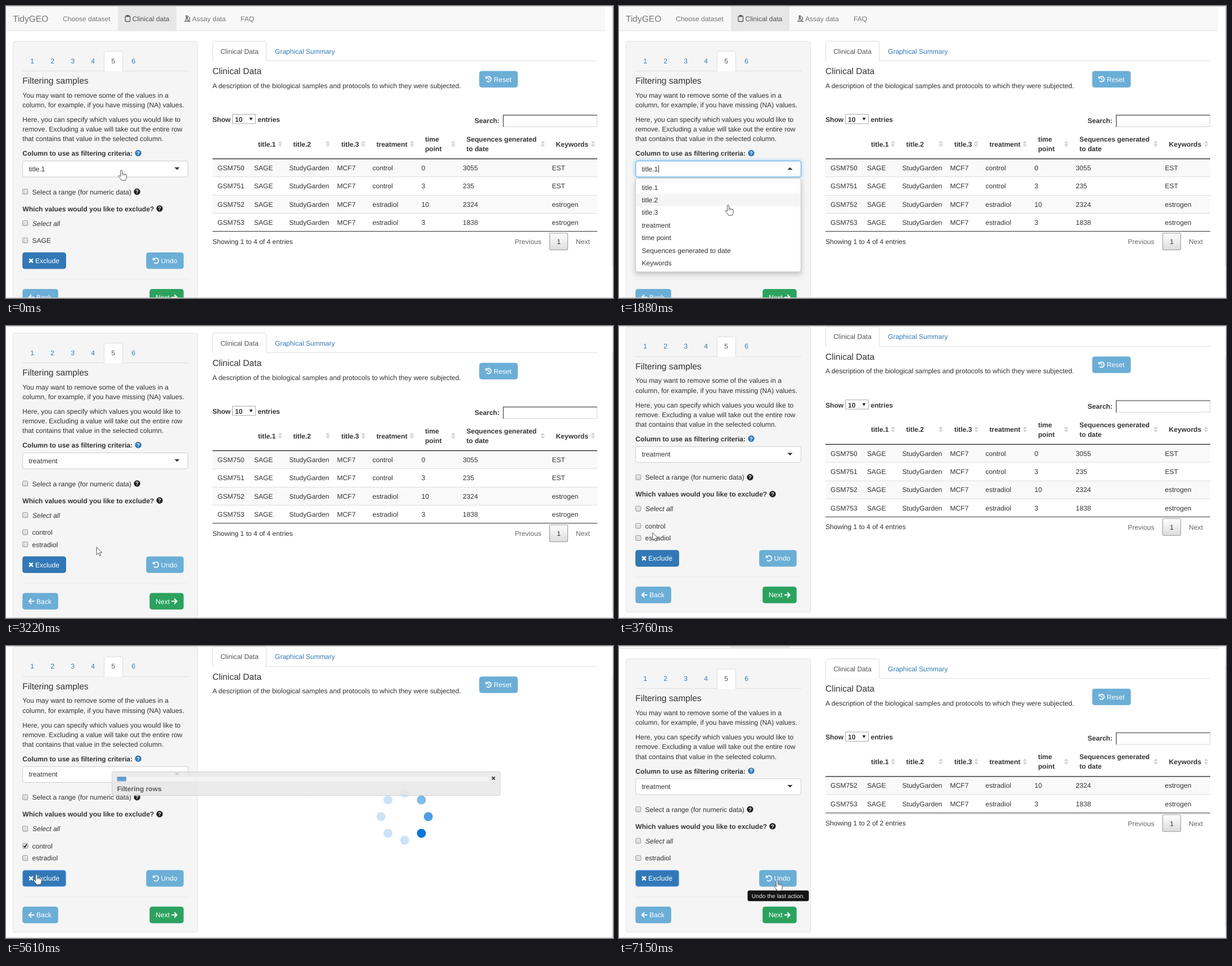
Write an HTML page with a canvas that moves like this. It is 1079x519 px and loops after 7.23 s.

```html
<!DOCTYPE html>
<html lang="en">
<head>
<meta charset="utf-8">
<title>Filtering samples</title>
<style>
  html, body { margin: 0; width: 100%; height: 100%; overflow: hidden; background: #fff; }
  canvas { display: block; }
</style>
</head>
<body>
<canvas id="stage" width="1079" height="519"></canvas>
<script>
const ctx = document.getElementById('stage').getContext('2d');
ctx.textRendering = 'geometricPrecision';

const LOOP = 7230, ZOOM = 0.8625, SIZE = 14 * ZOOM, HEADING = 18 * ZOOM, OPTION_STEP = 25 * ZOOM;
const INK = '#333', LINK = '#337ab7', SKY = '#6baed6', GREEN = '#2ca25f';
const OPEN = 720, CHOSEN = 2290, RELISTED = 2450, CHECKED = 4220, PRESSED = 5380,
      BUSY = 5610, DONE = 5920, TIP = 6990;

const COLUMNS = ['title.1', 'title.2', 'title.3', 'treatment', 'time point',
                 'Sequences generated to date', 'Keywords'];
const CELL_X = [376, 441, 503.5, 588.5, 651.5, 738.5, 812, 970.5];
const SAMPLES = [
  ['GSM750', 'control', '0', '3055', 'EST'],
  ['GSM751', 'control', '3', '235', 'EST'],
  ['GSM752', 'estradiol', '10', '2324', 'estrogen'],
  ['GSM753', 'estradiol', '3', '1838', 'estrogen'],
].map(([id, ...rest]) => [id, 'SAGE', 'StudyGarden', 'MCF7', ...rest]);

// time, scroll offset in unzoomed pixels
const SCROLL = [[0, 0], [3130, 23], [3220, 58], [3290, 71], [DONE, 46]];
// time, x, y, hand shape from here on
const POINTER = [
  [0, 205, 292, 1], [1150, 205, 292, 1], [1880, 194, 354, 1], [1940, 194, 354, 1],
  [2040, 185, 394, 1], [CHOSEN, 185, 394, 0], [2720, 185, 394, 0], [2820, 161, 393, 0],
  [3290, 161, 393, 0], [3830, 55, 366, 0], [3900, 55, 366, 0], [3990, 54, 356, 1],
  [4480, 54, 356, 1], [4680, 55, 365, 0], [4740, 56, 371, 1], [4860, 57, 388, 0],
  [4920, 57, 393, 0], [4995, 57, 393, 0], [5060, 55, 400, 1], [5150, 54, 406, 1],
  [5690, 54, 406, 1], [5760, 108, 409, 0], [6230, 402, 425, 0], [6660, 402, 425, 0],
  [6840, 314, 419, 1], [6960, 281, 417, 1], [LOOP, 281, 417, 1],
];
const HAND = new Path2D('M-1.5 1.2C-1.5-.6 1.5-.6 1.5 1.2V6.5C2 5.4 4 5.6 4.2 7 5 6 6.6 6.4 6.8 7.6 ' +
  '7.8 6.9 9.2 7.3 9.2 8.8V12.5C9.2 15 7.8 16 7.6 18H.2C0 16.3-3.5 13.5-5 10.6-5.6 9.2-3.4 8.6-1.5 11Z');
const ARROW = new Path2D('M0 0V13.5L3.1 10.6 5.3 15.6 7.5 14.6 5.4 9.8H9.6Z');

const clamp = v => Math.max(0, Math.min(1, v));
const lastKey = (keys, t) => keys.findLastIndex(k => k[0] <= t);

function pointerAt(t) {
  const i = lastKey(POINTER, t), a = POINTER[i], b = POINTER[i + 1] || a;
  const u = clamp((t - a[0]) / (b[0] - a[0] || 1)), e = u * u * (3 - 2 * u);
  return { x: a[1] + (b[1] - a[1]) * e, y: a[2] + (b[2] - a[2]) * e, hand: a[3] };
}

// y is the middle of the text line
function text(str, x, y, { color = INK, size = SIZE, style = '', align = 'left' } = {}) {
  ctx.save();
  ctx.transform(1, 1e-5, 0, 1, 0, 0); // a hair of skew lets baselines sit between pixel rows
  ctx.font = `${style} ${size}px "Liberation Sans", Arial, sans-serif`;
  ctx.fillStyle = color;
  ctx.textAlign = align;
  ctx.fillText(str, x, y + 0.35 + size * 0.3465);
  ctx.restore();
}
const bold = (str, x, y, color = INK) => text(str, x, y, { style: 'bold', color });

function rect(x, y, w, h, color) {
  ctx.fillStyle = color;
  ctx.fillRect(x, y, w, h);
}

function box(x, y, w, h, fill, border, r = 3.5) {
  ctx.beginPath();
  ctx.roundRect(x + 0.5, y + 0.5, w - 1, h - 1, r);
  ctx.fillStyle = fill;
  ctx.fill();
  if (border) line(border, 1);
}

function line(color, width) {
  ctx.strokeStyle = color;
  ctx.lineWidth = width;
  ctx.stroke();
}

function poly(points, color, width) {
  ctx.beginPath();
  points.forEach(([x, y]) => ctx.lineTo(x, y));
  if (width) return line(color, width);
  ctx.fillStyle = color;
  ctx.fill();
}

// isosceles triangle; negative height points upwards
const triangle = (x, y, halfW, h, color) =>
  poly([[x - halfW, y - h / 2], [x + halfW, y - h / 2], [x, y + h / 2]], color);

function disc(x, y, r, color) {
  ctx.beginPath();
  ctx.arc(x, y, r, 0, Math.PI * 2);
  ctx.fillStyle = color;
  ctx.fill();
}

function withShadow(color, blur, offset, draw) {
  ctx.save();
  Object.assign(ctx, { shadowColor: color, shadowBlur: blur, shadowOffsetY: offset });
  draw();
  ctx.restore();
}

function gradient(y, h, from, to) {
  const g = ctx.createLinearGradient(0, y, 0, y + h);
  g.addColorStop(0, from);
  g.addColorStop(1, to);
  return g;
}

function helpMark(x, y, color) {
  disc(x, y, 5.7, color);
  text('?', x, y - 0.2, { style: 'bold', size: 9.5, color: '#fff', align: 'center' });
}

function checkbox(y, checked) {
  box(29.2, y - 5, 10, 10, gradient(y - 5, 10, '#ebebeb', '#d6d6d6'), '#999', 1.5);
  if (checked) poly([[31.5, y], [33.5, y + 2.3], [37, y - 3]], '#222', 1.7);
}

function button(x, y, w, label, labelX, color, border = color) {
  box(x + 0.3, y - 15, w - 0.6, 34 * ZOOM, color, border);
  text(label, labelX, y - 0.5, { color: '#fff' });
}

function turnBack(x, y, clockHands) {
  ctx.beginPath();
  ctx.arc(x, y, 4.6, -2.5, 2.4);
  line('#fff', 1.8);
  poly([[x - 5.6, y - 5.6], [x - 5.6, y - 0.8], [x - 0.8, y - 0.8]], '#fff');
  if (clockHands) poly([[x + 0.3, y - 2.6], [x + 0.3, y + 0.6], [x + 2, y + 1.8]], '#fff', 1.3);
}

function cross(x, y, r, color, width) {
  poly([[x - r, y - r], [x + r, y + r]], color, width);
  poly([[x + r, y - r], [x - r, y + r]], color, width);
}

function arrowIcon(x, y, dir) {
  poly([[x - 5 * dir, y], [x + 4.4 * dir, y]], '#fff', 1.9);
  poly([[x + 0.3 * dir, y - 4.5], [x + 4.8 * dir, y], [x + 0.3 * dir, y + 4.5]], '#fff', 1.9);
}

function navbar() {
  rect(0, 0, 1065, 44, '#f8f8f8');
  rect(199, 0, 104, 44, '#e7e7e7');
  rect(0, 43.5, 1065, 1, '#e4e4e4');
  const grey = { color: '#777' };
  text('TidyGEO', 12, 22, { ...grey, size: HEADING });
  text('Choose dataset', 101, 22, grey);
  text('Clinical data', 224.5, 22, { color: '#555' });
  text('Assay data', 331, 22, grey);
  text('FAQ', 417, 22, grey);
  // clipboard
  ctx.beginPath();
  ctx.roundRect(212, 18, 8.5, 9.5, 1);
  line('#555', 1.3);
  rect(214, 16, 4.5, 3.5, '#555');
  // microscope
  rect(319.5, 16.5, 3.6, 7, '#777');
  rect(317, 26.3, 11, 1.7, '#777');
  rect(318, 24.3, 6, 1, '#777');
  ctx.beginPath();
  ctx.arc(322.5, 22.4, 4, -1.2, 1.4);
  line('#777', 1.5);
}

function tabs(left, right, y, activeX, activeW) {
  const x0 = activeX + 0.5, x1 = activeX + activeW - 0.5;
  rect(left, y + 35, right - left, 1, '#ddd');
  rect(activeX + 1, y + 1, activeW - 2, 35, '#fff');
  ctx.beginPath();
  ctx.moveTo(x0, y + 36);
  ctx.arcTo(x0, y + 0.5, activeX + 4, y + 0.5, 3.5);
  ctx.arcTo(x1, y + 0.5, x1, y + 4, 3.5);
  ctx.lineTo(x1, y + 36);
  line('#ddd', 1);
}

function sidebar(t, open) {
  const options = t < RELISTED ? ['SAGE'] : t < DONE ? ['control', 'estradiol'] : ['estradiol'];
  const extra = (options.length - 1) * OPTION_STEP;
  box(12, 62, 329, 487 + extra, '#f5f5f5', '#e3e3e3');

  tabs(29, 324, 80, 174, 34);
  for (let n = 1; n <= 6; n++)
    text(n, 10.5 + 36 * n, 97, { color: n === 5 ? '#555' : LINK, align: 'center' });

  text('Filtering samples', 29.3, 132.4, { size: HEADING });
  text('You may want to remove some of the values in a', 29.3, 158.2);
  text('column, for example, if you have missing (NA) values.', 29.3, 175.4);
  text('Here, you can specify which values you would like to', 29.3, 201.4);
  text('remove. Excluding a value will take out the entire row', 29.3, 218.6);
  text('that contains that value in the selected column.', 29.3, 235.9);
  bold('Column to use as filtering criteria:', 29.3, 261.7);
  helpMark(235, 261.5, LINK);

  const field = () => box(29.2, 275, 294.8, 34 * ZOOM, '#fff', open ? '#66afe9' : '#ccc');
  if (open) withShadow('rgba(102,175,233,.7)', 6, 0, field); else field();
  text(t < CHOSEN ? 'title.1' : 'treatment', 40.5, 289.2);
  triangle(304, 289, 4.6, open ? -4.4 : 4.4, INK);
  if (open && (t - OPEN) % 1060 < 530) rect(70, 283, 1, 13, INK);

  checkbox(330);
  text('Select a range (for numeric data)', 46.5, 330);
  helpMark(233, 330, '#222');
  bold('Which values would you like to exclude?', 29.3, 360);
  helpMark(273, 360, '#222');
  checkbox(386);
  text('Select all', 47, 386, { style: 'italic' });
  options.forEach((name, i) => {
    const y = 416.5 + OPTION_STEP * i;
    checkbox(y, name === 'control' && t >= CHECKED);
    text(name, 46.5, y);
  });

  const y = 453 + extra;
  const pressing = t >= PRESSED && t < PRESSED + 80;
  button(29, y, 78, 'Exclude', 52, pressing ? '#286090' : '#3278b6', t >= PRESSED ? '#5b9cec' : '#2a68a4');
  cross(44.5, y - 0.3, 3.3, '#fff', 2.5);
  button(249, y, 67, 'Undo', 275.5, SKY);
  turnBack(266.5, y - 0.3);
  rect(29, 485 + extra, 295, 1, '#ebebeb');
  button(29, y + 65, 64, 'Back', 54, SKY);
  arrowIcon(45.5, y + 64.7, -1);
  button(255, y + 65, 61, 'Next', 266, GREEN);
  arrowIcon(299, y + 64.7, 1);
}

function dropdown(pointerY) {
  const step = 22.45, hover = Math.max(0, Math.floor((pointerY - 311) / step));
  withShadow('rgba(0,0,0,.2)', 9, 4, () => box(29, 306, 295, 167, '#fff', '#ccc'));
  rect(30, 311 + hover * step, 293, step, '#f5f5f5');
  COLUMNS.forEach((name, i) => text(name, 40.5, 322 + step * i));
}

function table(rows) {
  bold('Show', 367, 201.2);
  box(402, 192, 42, 17.5, '#fff', '#a9a9a9', 0);
  bold('10', 407, 201.2);
  triangle(435.5, 201, 3, 5, '#222');
  bold('entries', 447.5, 201.2);
  bold('Search:', 833, 203.5);
  rect(883, 193, 168, 22, '#d4d4d4');
  rect(883, 193, 168, 2, '#8a8a8a');
  rect(883, 193, 2, 22, '#8a8a8a');
  rect(885, 195, 165, 19, '#fff');

  const headX = [448, 510.5, 596, 658.5, 745, 818.5, 977.5];
  const sortX = [487, 572, 635, 721.5, 795, 954, 1043.5];
  COLUMNS.forEach((name, i) => {
    const [, first, second] = name.match(/^(time|Sequences generated) (.*)$/) || [];
    if (second) {
      bold(first, headX[i], 236.4);
      bold(second, headX[i], 253.6);
    } else bold(name, headX[i], 245);
    triangle(sortX[i], 241.8, 3.8, -4.8, '#d3d3d3');
    triangle(sortX[i], 248.2, 3.8, 4.8, '#d3d3d3');
  });

  const rowH = 32.3, bottom = Math.round(271 + rows.length * rowH);
  rows.forEach((row, i) => {
    const top = Math.round(271 + rowH * i);
    if (i % 2 === 0) rect(367, top, 684, rowH, '#f9f9f9');
    if (i) rect(367, top, 684, 1, '#ddd');
    row.forEach((cell, c) => text(cell, CELL_X[c], 287.5 + rowH * i));
  });
  rect(367, 271, 684, 1.2, '#111');
  rect(367, bottom, 684, 1, '#333');

  text(`Showing 1 to ${rows.length} of ${rows.length} entries`, 367, bottom + 18);
  text('Previous', 904.5, bottom + 18.7, { color: '#666' });
  box(966, bottom + 3, 33, 31, gradient(bottom + 3, 31, '#fff', '#dcdcdc'), '#979797', 1.5);
  text('1', 982.5, bottom + 18.7, { align: 'center' });
  text('Next', 1013, bottom + 18.7, { color: '#666' });
}

function spinner(t) {
  const trail = [1, 0.7, 0.5, 0.2, 0.2, 0.2, 0.2, 0.2, 1];
  const head = 3 + Math.max(0, t - BUSY - 70) / 137.5;
  for (let i = 0; i < 8; i++) {
    const behind = (head - i + 16) % 8, k = Math.floor(behind);
    const alpha = trail[k] + (trail[k + 1] - trail[k]) * (behind - k);
    const a = i * Math.PI / 4;
    disc(708.7 + 42 * Math.sin(a), 364.5 - 42 * Math.cos(a), 8, `rgba(2,117,216,${alpha})`);
  }
}

function mainArea(t) {
  tabs(367, 1051, 62, 367, 96);
  text('Clinical Data', 415, 80, { color: '#555', align: 'center' });
  text('Graphical Summary', 478, 80, { color: LINK });
  text('Clinical Data', 367, 115.1, { size: HEADING });
  text('A description of the biological samples and protocols to which they were subjected.', 367, 141);
  button(841, 130.5, 69, 'Reset', 867, SKY);
  turnBack(857.8, 130, true);
  if (t >= BUSY && t < DONE) spinner(t);
  else table(t < BUSY ? SAMPLES : SAMPLES.slice(2));
}

function notification(t) {
  ctx.save();
  ctx.globalAlpha = 0.85 * clamp((DONE + 70 - t) / 150);
  box(188, 223, 691, 43, '#e8e8e8', '#ccc', 2.5);
  box(197, 232, 662, 9, '#f5f5f5', null, 3);
  const progress = 0.026 + 0.974 * clamp((t - BUSY - 75) / 160);
  box(197, 232, 662 * progress, 9, gradient(232, 9, '#3d80bd', '#5a9bd4'), null, 1);
  bold('Filtering rows', 197.5, 253.7, '#444');
  cross(866.5, 235, 2.6, '#222', 1.9);
  ctx.restore();
}

function tooltip(t) {
  ctx.save();
  ctx.globalAlpha = 0.92 * clamp((t - TIP) / 150);
  box(228, 434, 110, 20, '#000');
  triangle(283, 432, 4.3, -4.3, '#000');
  text('Undo the last action.', 283, 443.8, { size: 12 * ZOOM, color: '#fff', align: 'center' });
  ctx.restore();
}

function cursor({ x, y, hand }) {
  const shape = hand ? HAND : ARROW;
  ctx.save();
  ctx.translate(x, y);
  ctx.fillStyle = '#fff';
  ctx.fill(shape);
  ctx.strokeStyle = '#444';
  ctx.lineWidth = 0.9;
  ctx.lineJoin = 'round';
  ctx.stroke(shape);
  if (hand) {
    ctx.beginPath();
    for (const fx of [1.5, 4.2, 6.8]) {
      ctx.moveTo(fx, 7);
      ctx.lineTo(fx, 9.5);
    }
    line('#444', 0.7);
  }
  ctx.restore();
}

function windowEdges(scroll) {
  rect(0, 0, 1079, 1, '#cdcdcd');
  rect(0, 518, 1079, 1, '#cfcfcf');
  rect(1078, 0, 1, 519, '#e2e2e2');
  rect(1078, scroll * 0.9, 1, 462, '#c4c4c4');
}

function draw(t) {
  const scroll = SCROLL[lastKey(SCROLL, t)][1] * ZOOM;
  const pointer = pointerAt(t);
  const open = t >= OPEN && t < CHOSEN;
  rect(0, 0, 1079, 519, '#fff');
  ctx.save();
  ctx.translate(0, -scroll);
  navbar();
  sidebar(t, open);
  mainArea(t);
  if (open) dropdown(pointer.y);
  ctx.restore();
  if (t >= BUSY && t < DONE + 70) notification(t);
  if (t >= TIP) tooltip(t);
  windowEdges(scroll);
  cursor(pointer);
}

function tick() {
  draw(performance.now() % LOOP);
  requestAnimationFrame(tick);
}
tick();
</script>
</body>
</html>
```
